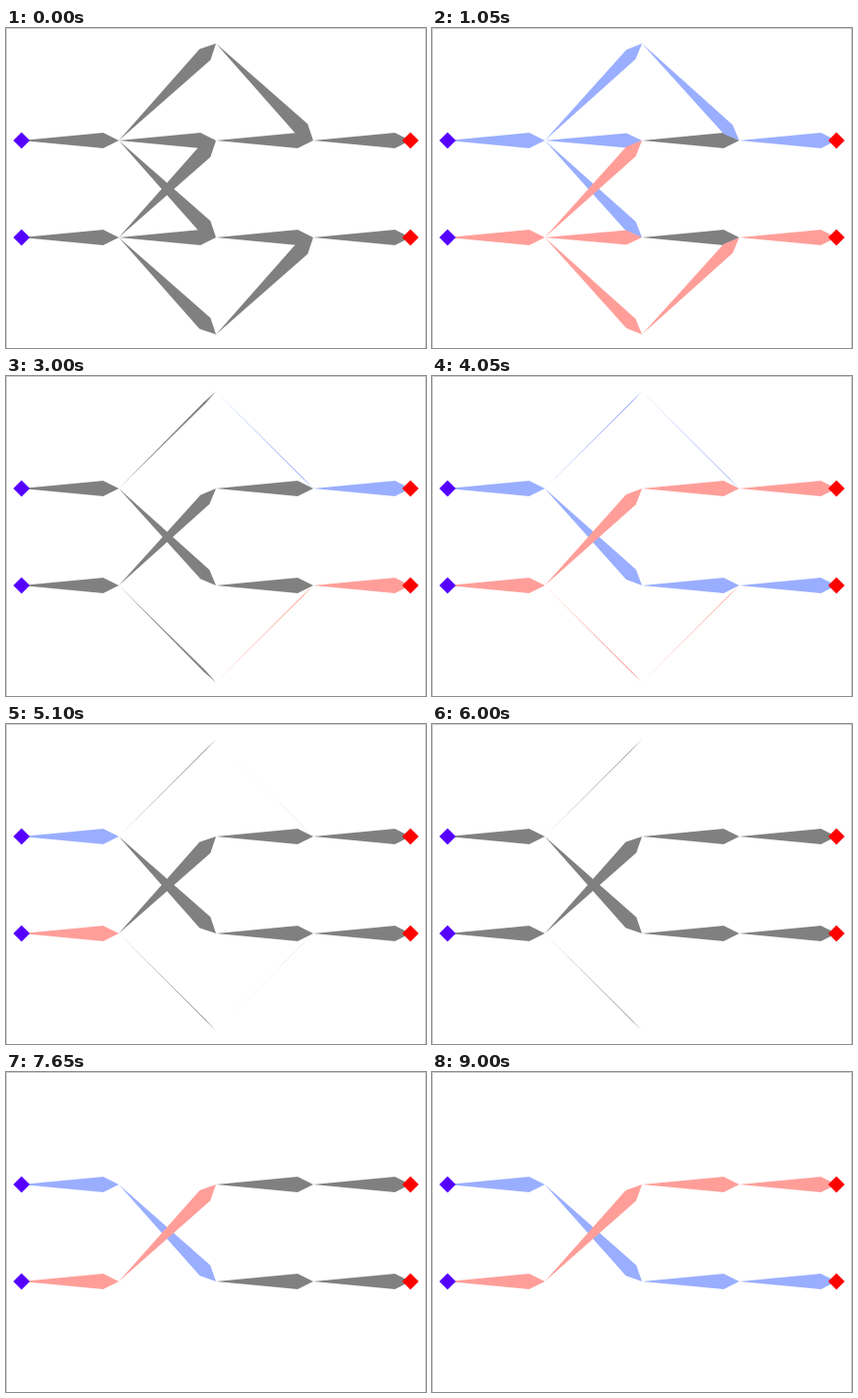
These frames come from a looping animation (432 by 330 pixels, 9150 ms). An HTML page with a canvas:

```html
<!DOCTYPE html>
<html lang="en">
<head>
<meta charset="utf-8">
<style>
html, body { margin: 0; width: 100%; height: 100%; overflow: hidden; background: #fff; }
canvas { display: block; }
</style>
</head>
<body>
<canvas id="stage" width="432" height="330"></canvas>
<script>
const ctx = document.getElementById('stage').getContext('2d');
const LOOP = 9150, STEP = 150;
const GRAY = '#808080', BLUE = '#99aeff', RED = '#ff9e99';

// Width over time: [ms, scale] pairs, linear in between
const FULL = [[0, 1]];
const RISE = [[0, 1], [1050, .85], [2100, .35], [3150, .1], [4050, .07], [5100, .05], [6300, .03], [6450, 0]];
const FALL = [[0, 1], [1050, .82], [2100, .06], [4050, .05], [5100, .01], [5550, 0]];
const AHEAD = [[0, 1], [1050, .95], [2100, .07], [3150, 0]];
const CROSS = [[0, 1], [1050, .87], [2100, .76], [4050, .9], [5100, 1], [6750, .95]];

// Each wave lights the four stages in turn, then clears them in turn
const WAVES = [
  { on: ramp(150), off: ramp(1200) },
  { on: ramp(1500), off: ramp(2100) },
  { on: ramp(2250), off: ramp(2850) },
  { on: [3300, 3600, 3900, 4050], off: ramp(4200) },
  { on: ramp(5100), off: ramp(6000, 0) },
  { on: ramp(6300), off: ramp(6900) },
  { on: ramp(7500), off: ramp(LOOP, 0) }
];
const SWAP = 3300; // from here on the two flows have changed lanes

// Edges: stage, start, end, width curve, colour before and after the swap
const EDGES = [
  [0, 16, 116, 116, 116, FULL, BLUE, BLUE],
  [1, 116, 116, 216, 16, RISE, BLUE, BLUE],
  [1, 116, 116, 216, 116, AHEAD, BLUE, BLUE],
  [1, 116, 116, 216, 216, CROSS, BLUE, BLUE],
  [0, 16, 216, 116, 216, FULL, RED, RED],
  [1, 116, 216, 216, 116, CROSS, RED, RED],
  [1, 116, 216, 216, 216, AHEAD, RED, RED],
  [1, 116, 216, 216, 316, RISE, RED, RED],
  [2, 216, 116, 316, 116, FULL, GRAY, RED],
  [2, 216, 216, 316, 216, FULL, GRAY, BLUE],
  [2, 216, 16, 316, 116, FALL, BLUE, BLUE],
  [2, 216, 316, 316, 216, FALL, RED, RED],
  [3, 316, 116, 416, 116, FULL, BLUE, RED],
  [3, 316, 216, 416, 216, FULL, RED, BLUE]
];

function ramp(start, gap = STEP) {
  return [0, 1, 2, 3].map(i => start + i * gap);
}

function sample(keys, t) {
  const i = keys.findIndex(k => k[0] > t);
  if (i < 0) return keys[keys.length - 1][1];
  const [t0, a] = keys[i - 1], [t1, b] = keys[i];
  return a + (b - a) * (t - t0) / (t1 - t0);
}

function poly(color, points) {
  ctx.fillStyle = color;
  ctx.beginPath();
  points.forEach(p => ctx.lineTo(...p));
  ctx.fill();
}

function arrow(x0, y0, x1, y1, scale, color) {
  const len = Math.hypot(x1 - x0, y1 - y0);
  const ux = (x1 - x0) / len, uy = (y1 - y0) / len;
  const bx = x1 - 16 * ux, by = y1 - 16 * uy, h = 8 * scale;
  poly(color, [[x0, y0], [bx - uy * h, by + ux * h], [x1, y1], [bx + uy * h, by - ux * h]]);
}

function diamond(x, y, color) {
  const r = 8.5;
  poly(color, [[x - r, y], [x, y - r], [x + r, y], [x, y + r]]);
}

function draw(t) {
  ctx.fillStyle = '#fff';
  ctx.fillRect(0, 0, 432, 330);
  ctx.fillStyle = '#ccc';
  ctx.fillRect(0, 0, 432, 1);
  ctx.fillRect(0, 0, 1, 330);
  ctx.fillRect(431, 0, 1, 330);

  for (const [stage, x0, y0, x1, y1, keys, before, after] of EDGES) {
    const scale = sample(keys, t);
    if (scale <= 0) continue;
    const lit = WAVES.some(w => t >= w.on[stage] && t < w.off[stage]);
    arrow(x0, y0, x1, y1, scale, lit ? (t < SWAP ? before : after) : GRAY);
  }
  for (const y of [116, 216]) {
    diamond(16, y, '#5500ff');
    diamond(416, y, '#ff0000');
  }
}

function frame() {
  draw(Math.floor(performance.now() % LOOP / STEP) * STEP);
  requestAnimationFrame(frame);
}
frame();
</script>
</body>
</html>
```
